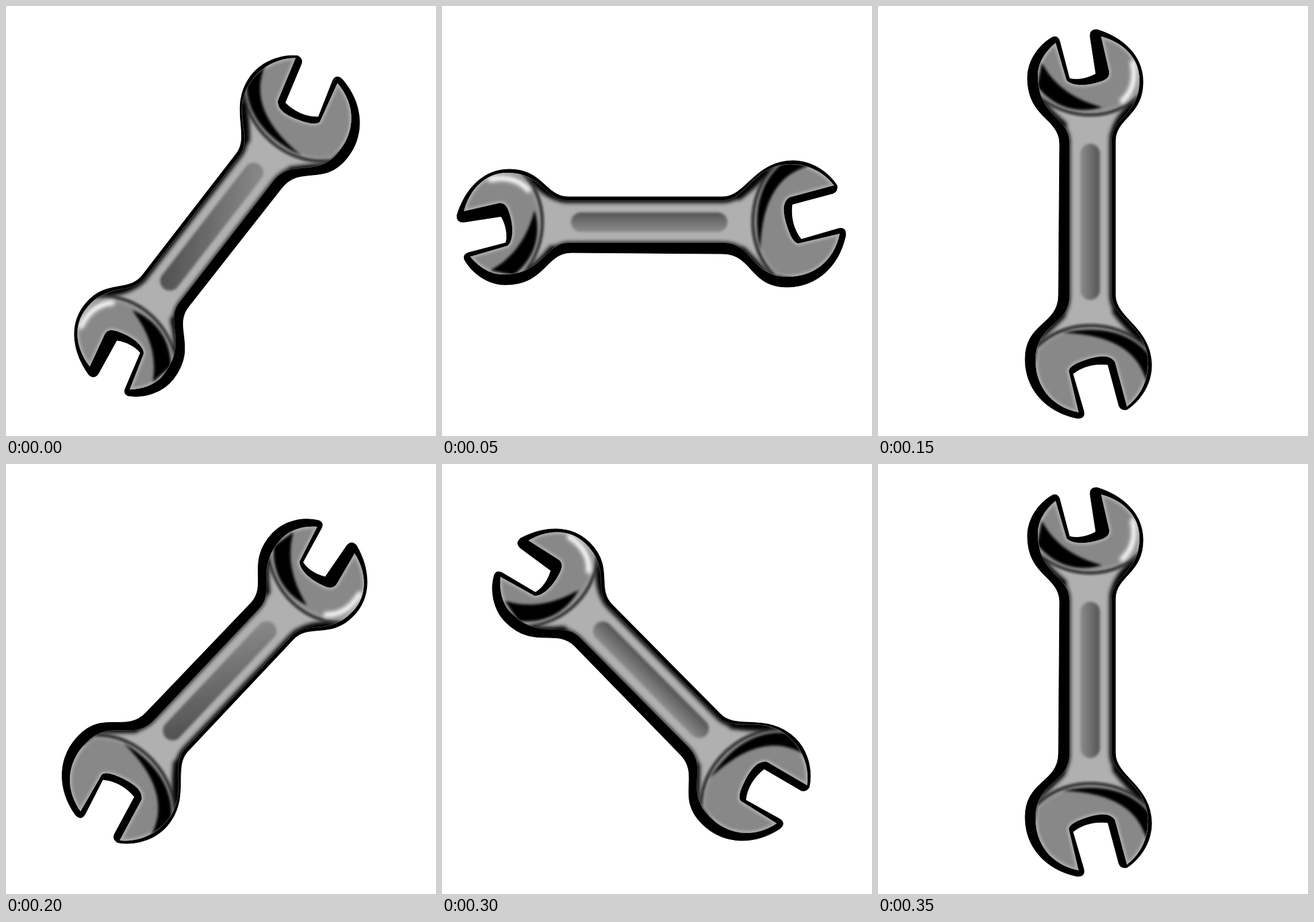
Recreate the animation shown at these times as an HTML page. Size 748 px wide and 748 px high, loop 400 ms.

```html
<!DOCTYPE html>
<html lang="en">
<head>
<meta charset="utf-8">
<title>Spinning wrench</title>
<style>
  html, body { margin: 0; width: 100%; height: 100%; overflow: hidden; background: #fff; }
  svg { display: block; width: 100%; height: 100%; }
</style>
</head>
<body>
<svg viewBox="0 0 748 748">
  <defs>
    <path id="metal" d="M38 357C48 318 76 290 113 290C176 290 178 338 220 338H488C530 338 539 276 606 275C645 275 670 296 682 312L604 333C592 342 592 358 601 385C606 400 612 412 620 413L692 396C682 445 645 471 602 471C535 471 543 412 488 412H222C178 412 178 467 106 467C82 467 62 452 49 436L114 417C124 408 125 384 117 360C113 347 108 342 99 343Z"/>
    <path id="smallFace" d="M134 286C190 330 185 420 140 466L20 500V280Z"/>
    <path id="bigFace" d="M590 270C530 310 522 420 580 470L760 500V260Z"/>
    <clipPath id="inMetal"><use href="#metal"/></clipPath>
    <clipPath id="inFaces"><use href="#smallFace"/><use href="#bigFace"/></clipPath>
    <filter id="soft" filterUnits="userSpaceOnUse" x="0" y="240" width="748" height="280"><feGaussianBlur stdDeviation="2"/></filter>
    <filter id="softer" filterUnits="userSpaceOnUse" x="0" y="240" width="748" height="280"><feGaussianBlur stdDeviation="3.6"/></filter>
    <linearGradient id="grooveShade" x2="0" y2="1">
      <stop stop-color="#555"/><stop offset="1" stop-color="#8c8c8c"/>
    </linearGradient>
    <linearGradient id="endShade">
      <stop stop-color="#4c4c4c" stop-opacity=".8"/><stop offset="1" stop-color="#8c8c8c" stop-opacity=".8"/>
    </linearGradient>
  </defs>

  <g id="wrench">
    <path stroke="#000" stroke-linejoin="round" d="M26 364C40 318 72 284 117 284C176 284 180 332 220 332H488C528 332 543 271 609 269C650 269 677 296 687 312Q689 323 680 326L609 345C606 368 612 390 625 406L690 387Q704 384 702 400C690 455 650 489 600 489C535 489 540 431 488 431L225 429C180 429 180 485 110 485C80 485 52 465 39 441Q36 432 46 429L111 412C115 398 111 380 103 366L38 376Q25 377 26 364Z"/>
    <g clip-path="url(#inMetal)" fill="none" stroke-linecap="round">
      <use href="#metal" fill="#b0b0b0"/>
      <!-- dark edges of neck and shaft -->
      <g stroke="#000" filter="url(#softer)">
        <path d="M150 292C182 308 184 337 220 337H488C528 337 536 292 575 277" stroke-width="11"/>
        <path d="M140 468C178 454 184 414 222 414H488C534 414 536 450 575 471" stroke-width="7"/>
        <path d="M160 302Q178 323 200 331M516 330Q540 312 562 288M150 464Q175 446 192 424M522 426Q537 441 562 468" stroke-width="15"/>
      </g>
      <!-- heads and their rims -->
      <g fill="#888">
        <use href="#smallFace"/>
        <use href="#bigFace"/>
      </g>
      <g clip-path="url(#inFaces)">
        <use href="#metal" stroke="#ccc" stroke-width="8" opacity=".5" filter="url(#soft)"/>
      </g>
      <g stroke="#111" stroke-width="4" filter="url(#soft)">
        <use href="#smallFace"/>
        <use href="#bigFace"/>
      </g>
      <g stroke="#999" stroke-width="3" filter="url(#soft)">
        <path d="M130 292C181 330 178 420 137 461"/>
        <path d="M594 275C538 315 530 415 583 465"/>
      </g>
      <g fill="#000" filter="url(#soft)">
        <path d="M84 460C122 440 148 405 161 355C174 400 160 440 125 468Z"/>
        <path d="M641 278C594 288 556 328 554 424C542 370 546 308 596 270Z"/>
      </g>
      <path d="M84 302Q126 293 150 320" stroke="#fff" stroke-width="9" filter="url(#softer)"/>
      <use href="#metal" stroke="#888" stroke-width="1.2" opacity=".6"/>
    </g>
    <g filter="url(#soft)">
      <rect x="224.500" y="359" width="272" height="34" rx="17" fill="url(#grooveShade)"/>
      <rect id="grooveEnd" x="224.500" y="359" width="272" height="34" rx="17" fill="url(#endShade)"/>
    </g>
  </g>
</svg>
<script>
  const STEP = 50;
  const wrench = document.getElementById("wrench");
  const grooveEnd = document.getElementById("grooveEnd");

  // Centre, angle, and which end of the groove is darker (-1 small head, 1 big head).
  const pose = (x, y, angle, darkEnd = 0) => ({ x, y, angle, darkEnd });
  const level = pose(360.5, 376, 0);
  const falling = pose(363.5, 375.5, 45.3);
  const upright = pose(369, 375.5, 90);
  const poses = [
    pose(358, 384, -52.3, -1), level, falling, upright,
    pose(371.5, 377, 133.3, 1), level, falling, upright
  ];

  function draw() {
    const { x, y, angle, darkEnd } = poses[Math.floor(performance.now() / STEP) % poses.length];
    wrench.setAttribute("transform", `translate(${x} ${y}) rotate(${angle}) translate(-360.5 -376)`);
    grooveEnd.setAttribute("opacity", Math.abs(darkEnd));
    grooveEnd.setAttribute("transform", darkEnd > 0 ? "matrix(-1 0 0 1 721 0)" : "");
    requestAnimationFrame(draw);
  }
  draw();
</script>
</body>
</html>
```
